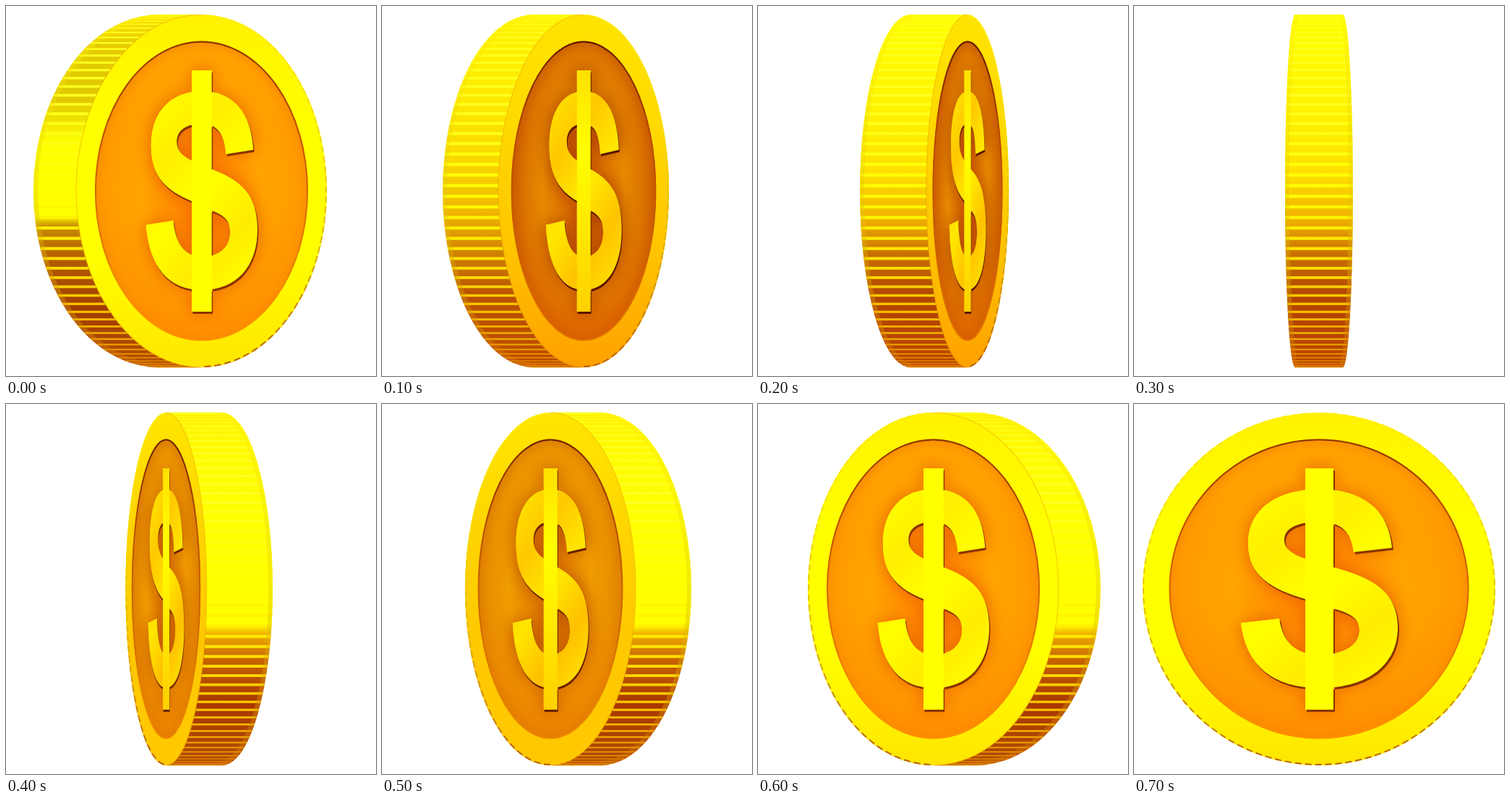
An HTML page with a canvas that plays this animation: 512x512 px, repeating every 800 ms.

```html
<!DOCTYPE html>
<html lang="en">
<head>
<meta charset="utf-8">
<title>Spinning coin</title>
<style>
  html, body { margin: 0; width: 100%; height: 100%; overflow: hidden; background: #fff; }
  canvas { display: block; width: 512px; height: 512px; }
</style>
</head>
<body>
<canvas id="stage" width="512" height="512"></canvas>
<script>
const ctx = document.getElementById('stage').getContext('2d');
const STEP = 100, CY = 256, R = 244, INNER = 207.5, RIDGES = 104, QUARTER = Math.PI / 2;

const bright = {
  ring: ['#fff200', '#ffff00', '#ffff00', '#ffe600'],
  field: ['#ff8400', '#ffa400', '#ff9a00'],
  sign: ['#ffff00', '#ffee00', '#ffff00', '#ffec00', '#ffff00'],
  shade: 'rgba(225,75,0,.8)', rim: '#8a3400'
};
const dark = {
  ring: ['#ffe400', '#ffd800', '#ffc400', '#ffa000'],
  field: ['#d86800', '#e68a00', '#d06000'],
  sign: ['#ffe400', '#ffc800', '#ffe800', '#ffc200', '#ffe400'],
  shade: 'rgba(150,35,0,.8)', rim: '#5c1400'
};
const warm = {
  ring: ['#ffe600', '#ffd400', '#ffc800', '#ffc800'],
  field: ['#e07c00', '#f09c00', '#e48800'],
  sign: ['#ffe400', '#ffc800', '#ffe600', '#ffc000', '#ffe400'],
  shade: 'rgba(165,50,0,.75)', rim: '#6c2000'
};

// wall colours: [height 0..1, colour]
const wallA = [[0, '#ffe800'], [.08, '#e6cc00'], [.24, '#e0c800'], [.36, '#ffff00'],
  [.57, '#ffff00'], [.6, '#c88a00'], [.7, '#b25a00'], [.84, '#a03c00'], [1, '#b85000']];
const wallB = [[0, '#fff400'], [.2, '#ffec00'], [.42, '#f8d800'], [.56, '#efb600'],
  [.68, '#d08000'], [.8, '#b85000'], [1, '#c04c00']];
const wallC = [[0, '#ffff00'], [.25, '#fff400'], [.45, '#ffe000'], [.58, '#f0b000'],
  [.68, '#c87000'], [.8, '#b04400'], [1, '#bc4400']];
const wallD = [[0, '#fff000'], [.1, '#fffa00'], [.25, '#ffff00'], [.6, '#ffff00'],
  [.63, '#eeaa00'], [.7, '#c66200'], [.82, '#a83800'], [1, '#b44c00']];

// x, s: centre and width of the face; depth, back: offset and radius of the far side
const poses = [
  { x: 270.5, s: .711, depth: -59, back: 173.5, skin: bright, wall: wallA },
  { x: 279, s: .484, depth: -69, back: 126, skin: dark, wall: wallB },
  { x: 290, s: .234, depth: -79, back: 70, skin: dark, wall: wallC },
  { x: 289, s: .057, depth: -66, back: 14, skin: null, wall: wallC },
  { x: 221.5, s: .23, depth: 77.5, back: 70, skin: warm, wall: wallD },
  { x: 233, s: .484, depth: 69, back: 126, skin: warm, wall: wallD },
  { x: 242.5, s: .711, depth: 58, back: 173.5, skin: bright, wall: wallD },
  { x: 256, s: 1, depth: 0, skin: bright, wall: null }
];

const letter = new Path2D('M304 205L357 199C353 148 318 118 257 118C197 118 158 146 158 193' +
  'C158 238 190 256 237 270L276 283C304 291 312 299 312 313C312 334 290 347 257 347' +
  'C222 347 206 329 201 297L148 303C155 362 192 393 257 393C325 393 365 360 365 309' +
  'C365 262 333 241 276 226L237 214C216 207 208 199 208 188C208 172 226 163 257 163' +
  'C286 163 301 177 304 205Z');
const bar = new Path2D('M237 89H276V423H237Z');
const sign = new Path2D();
sign.addPath(letter);
sign.addPath(bar);

function ramp(g, stops) {
  stops.forEach((s, i) => Array.isArray(s)
    ? g.addColorStop(s[0], s[1])
    : g.addColorStop(i / (stops.length - 1), s));
  return g;
}
const down = (a, b, stops) => ramp(ctx.createLinearGradient(0, a, 0, b), stops);

function oval(x, rx, ry) {
  ctx.beginPath();
  ctx.ellipse(x, CY, rx, ry, 0, 0, Math.PI * 2);
}

// left (dir < 0) or right half of an ellipse
function halfOval(x, rx, ry, dir) {
  ctx.beginPath();
  ctx.ellipse(x, CY, rx, ry, 0, -QUARTER, QUARTER, dir < 0);
}

function bevel(x, rx, dir) {
  ctx.lineWidth = 6;
  ctx.strokeStyle = down(12, 500, ['rgba(255,240,0,.4)', 'rgba(225,205,0,.4)', 'rgba(215,120,0,.4)']);
  halfOval(x - dir * 3, rx, R - 3, dir);
  ctx.stroke();
}

function drawWall({ x, s, depth, back, skin, wall }) {
  const far = x + depth, front = R * s, dir = Math.sign(depth);
  const frontDir = skin ? dir : -dir;
  ctx.fillStyle = down(12, 500, wall);
  oval(far, back, R);
  ctx.fill();
  oval(x, front, R);
  ctx.fill();
  ctx.fillRect(Math.min(x, far), 12, Math.abs(depth), 2 * R);

  ctx.fillStyle = down(12, 500, ['#ffff20', '#ffff20', '#ffff00', '#ffd800', '#e89000']);
  for (let i = 0; i < RIDGES / 2; i++) {
    const a = (i + .5) / RIDGES * Math.PI * 2, c = Math.sin(a);
    const y = CY - R * Math.cos(a), h = Math.max(1, 4.4 * c);
    const from = far + dir * back * c, to = x + frontDir * front * c;
    ctx.fillRect(Math.min(from, to), y - h / 2, Math.abs(to - from), h);
  }

  bevel(far, back, dir);
  if (!skin) bevel(x, front, frontDir);
}

function drawSign(skin) {
  ctx.save();
  ctx.shadowColor = skin.shade;
  ctx.shadowBlur = 24;
  ctx.fillStyle = skin.sign[0];
  ctx.fill(sign);
  ctx.restore();

  ctx.save();
  ctx.translate(2, 3);
  ctx.fillStyle = skin.rim;
  ctx.fill(sign);
  ctx.restore();

  ctx.fillStyle = ramp(ctx.createLinearGradient(165, 125, 350, 390), skin.sign);
  ctx.fill(letter);
  ctx.fillStyle = skin === bright ? '#ffff00' : down(89, 423, ['#ffe000', '#ffff00', '#ffe800', '#ffd000']);
  ctx.fill(bar);
}

function drawRing({ x, s, depth, skin }) {
  const rx = R * s;
  oval(x, rx, R);
  ctx.fillStyle = down(12, 500, skin.ring);
  ctx.fill();

  if (depth) {
    ctx.lineWidth = 1.5;
    ctx.strokeStyle = 'rgba(225,150,0,.35)';
    halfOval(x, rx, R, depth);
    ctx.stroke();
  }

  // milled outline on the free side
  ctx.lineWidth = 2;
  ctx.strokeStyle = down(12, 500, ['#ffee00', '#f2dc00', '#dcb000', '#b86000']);
  ctx.setLineDash([9, 5]);
  if (depth) halfOval(x, rx - 1, R - 1, -depth);
  else oval(x, rx - 1, R - 1);
  ctx.stroke();
  ctx.setLineDash([]);
}

function drawField({ x, s, skin }) {
  const rx = INNER * s;
  ctx.save();
  oval(x, rx, INNER);
  ctx.clip();

  ctx.save();
  ctx.translate(x, CY);
  ctx.scale(s, 1);
  ctx.fillStyle = ramp(ctx.createRadialGradient(0, 0, 30, 0, 0, INNER), skin.field);
  ctx.fillRect(-INNER, -INNER, 2 * INNER, 2 * INNER);
  ctx.restore();

  ctx.fillStyle = down(49, 464, ['rgba(255,190,0,.2)', 'rgba(255,140,0,0)', 'rgba(255,100,0,.25)']);
  ctx.fillRect(0, 0, 512, 512);

  // shadow cast by the raised rim
  ctx.shadowColor = skin.shade;
  ctx.shadowBlur = 14;
  ctx.lineWidth = 4;
  ctx.strokeStyle = down(49, 464, [[0, skin.rim], [.3, 'rgba(175,65,0,.8)'],
    [.7, 'rgba(205,95,0,.5)'], [1, 'rgba(255,170,0,.25)']]);
  oval(x, rx, INNER);
  ctx.stroke();
  ctx.restore();
}

function drawFace(pose) {
  drawRing(pose);
  drawField(pose);
  ctx.save();
  ctx.translate(pose.x, 0);
  ctx.scale(pose.s, 1);
  ctx.translate(-256, 0);
  drawSign(pose.skin);
  ctx.restore();
}

let shown = -1;
function tick() {
  const i = Math.floor(performance.now() / STEP) % poses.length;
  if (i !== shown) {
    shown = i;
    const pose = poses[i];
    ctx.clearRect(0, 0, 512, 512);
    if (pose.wall) drawWall(pose);
    if (pose.skin) drawFace(pose);
  }
  requestAnimationFrame(tick);
}
tick();
</script>
</body>
</html>
```
